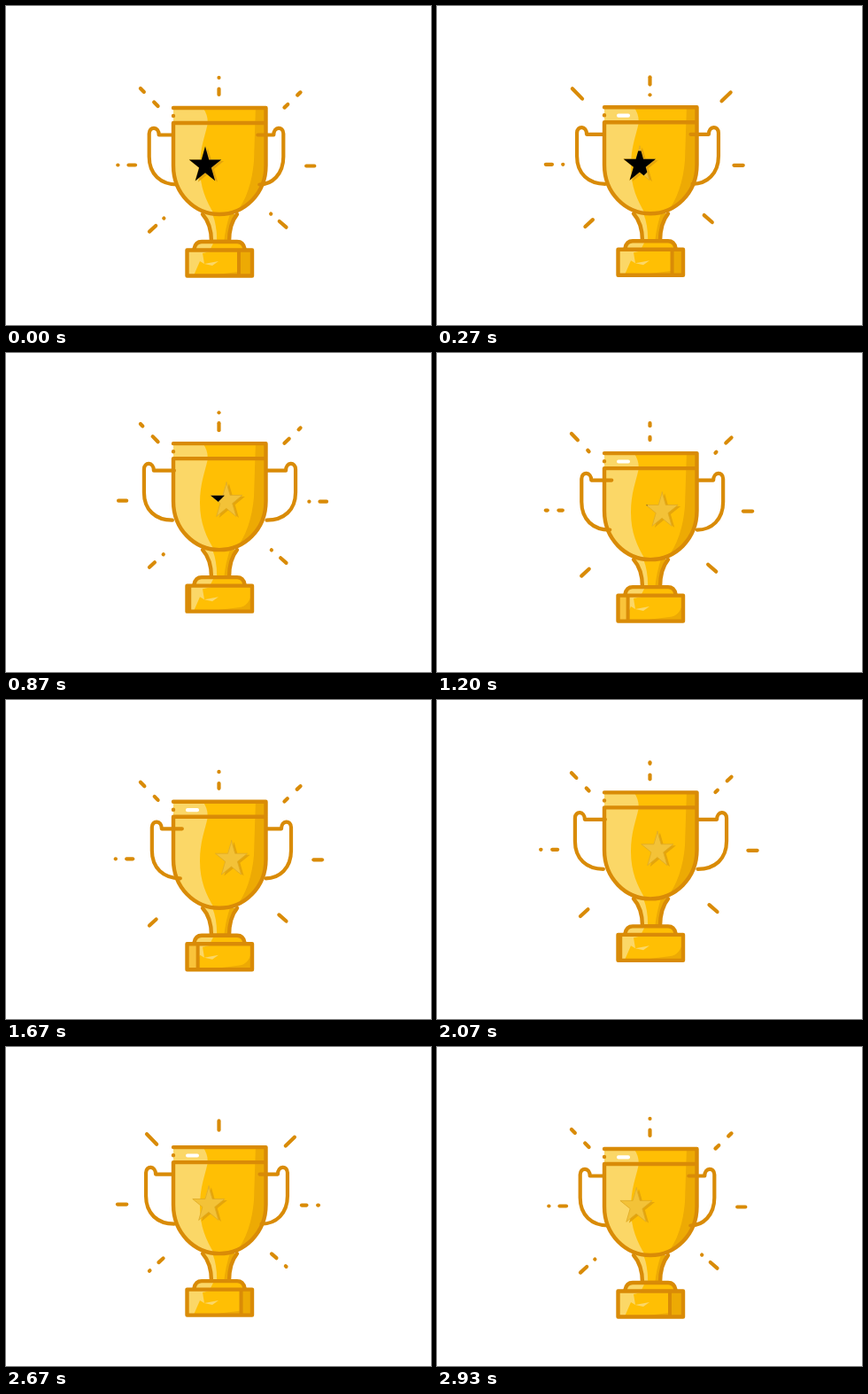
Recreate the animation shown at these times as an HTML page with a canvas. Size 480x360 px, loop 2.99 s.

```html
<!DOCTYPE html>
<html lang="en">
<head>
<meta charset="utf-8">
<title>Trophy</title>
<style>
html, body { margin: 0; width: 100%; height: 100%; overflow: hidden; background: #fff; }
canvas { display: block; }
</style>
</head>
<body>
<canvas id="stage" width="480" height="360"></canvas>
<script>
const ctx = document.getElementById('stage').getContext('2d');
const LOOP = 2990, STEP = 200 / 3, CYCLE = 44;
const LINE = '#d98b07', GOLD = '#ffbf04', LIGHT = '#fbd767', SHADE = '#edaa04';

const cup = new Path2D('M189 115H293.5V180C293.5 212 269 235 241 235S189 212 189 180Z');
const cupLight = new Path2D('M185 112H220Q229 122 227.5 134C225 146 219 160 219 182C219 206 227 222 237 238H185Z');
const cupShade = new Path2D('M282 112H298V240H253C270 226 278 200 280 175Z');
const cupLines = new Path2D('M189 115H293.5M189 124V124.1M293.5 115V180C293.5 212 269 235 241 235S189 212 189 180V132H293.5');
const stem = new Path2D('M222 235Q232 246 232 266H252Q252 246 261 235');
const plate = new Path2D('M212.5 274Q214 266 221 266H261Q268 266 269.5 274');
const base = new Path2D('M204.5 275.5H278V304.5H204.5Z');

const star = new Path2D();
for (let i = 0; i < 10; i++) {
  const r = i % 2 ? 7.6 : 20, a = i * Math.PI / 5;
  star.lineTo(r * Math.sin(a) * .95, -r * Math.cos(a) * 1.07);
}
star.closePath();

function fill(path, color) { ctx.fillStyle = color; ctx.fill(path); }

function stroke(path, width = 4.4) {
  ctx.strokeStyle = LINE;
  ctx.lineWidth = width;
  ctx.stroke(path);
}

function clipped(path, draw) {
  ctx.save();
  ctx.clip(path);
  draw();
  ctx.restore();
}

// A ray from its outer to its inner end, broken by a gap that travels outwards
function ray(x0, y0, x1, y1, gap) {
  const len = Math.hypot(x1 - x0, y1 - y0), half = .19 * len;
  const dx = (x1 - x0) / len, dy = (y1 - y0) / len;
  const mid = (gap - Math.floor(gap)) * len;
  for (let k = -1; k < 2; k++) {
    const a = Math.max(0, mid + k * len + half);
    const b = Math.min(len, mid + (k + 1) * len - half);
    if (b - a < 1.5) continue;
    const cap = Math.min(2, (b - a) / 2 - .05), p = new Path2D();
    p.moveTo(x0 + dx * (a + cap), y0 + dy * (a + cap));
    p.lineTo(x0 + dx * (b - cap), y0 + dy * (b - cap));
    stroke(p, 4.2);
  }
}

// side: 1 opens to the right (left handle), -1 opens to the left
function handle(x, side, arm) {
  const p = new Path2D(), at = d => x + side * d;
  p.moveTo(at(arm), 145.5);
  p.lineTo(at(11), 145.5);
  p.bezierCurveTo(at(11), 135.5, at(0), 135.5, at(0), 144);
  p.lineTo(at(0), 170);
  p.bezierCurveTo(at(0), 190, at(13), 201.5, at(arm - 2), 201.5);
  stroke(p, 4.2);
}

function drawStar(x, n) {
  ctx.save();
  ctx.translate(x + 3, 181.5);
  clipped(star, () => { ctx.fillStyle = '#e5a50a'; ctx.fillRect(-25, -25, 50, 50); });
  ctx.translate(-3, -1.5);
  fill(star, '#f3c238');
  ctx.strokeStyle = '#dfaa25';
  ctx.lineWidth = .8;
  ctx.stroke(star);
  // dark face, wiped away towards the left arm
  const edge = 28 - 2.8 * n, top = Math.min(-6.5, -25 + 2.3 * n);
  if (edge > -24) {
    const wipe = new Path2D();
    wipe.moveTo(-40, top);
    wipe.lineTo(edge - top, top);
    wipe.lineTo(edge - 30, 30);
    wipe.lineTo(-40, 30);
    clipped(wipe, () => fill(star, '#000'));
  }
  ctx.restore();
}

function drawBase(cos) {
  fill(stem, GOLD);
  clipped(stem, () => {
    fill(new Path2D('M220 232H232Q239 248 238 268H220Z'), LIGHT);
    fill(new Path2D('M254 232H264V268H246Q248 248 254 232Z'), SHADE);
  });
  stroke(stem);
  fill(plate, GOLD);
  clipped(plate, () => fill(new Path2D('M210 264H236L230 276H210Z'), LIGHT));
  stroke(plate);

  const seam = cos > 0 ? 279 - 16 * cos : 203 - 15 * cos;
  fill(base, GOLD);
  clipped(base, () => {
    fill(new Path2D('M204 275H240L222 279L224 291L219 288L212 304H204Z'), LIGHT);
    fill(new Path2D('M224 291L240 288L233 293Z'), LIGHT);
    fill(new Path2D('M278 280Q276 299 262 300L230 304H279Z'), SHADE);
    ctx.fillStyle = cos > 0 ? SHADE : '#f9c33a';
    if (cos > 0) ctx.fillRect(seam, 275, 20, 30);
    else ctx.fillRect(200, 275, seam - 200, 30);
    ctx.fillStyle = LINE;
    ctx.fillRect(seam - 2, 275, 4, 30);
  });
  stroke(base);
}

function drawCup() {
  fill(cup, GOLD);
  clipped(cup, () => { fill(cupLight, LIGHT); fill(cupShade, SHADE); });
  stroke(cupLines);
}

function draw(n) {
  const turn = 2 * Math.PI * n / CYCLE, cos = Math.cos(turn);
  const spread = Math.abs(Math.sin(turn)) ** 1.5;
  const lift = 14 * ((1 + Math.cos(2 * turn - 3.302)) / 2) ** 2;
  const middle = 240.6 - 3.1 * cos, reach = 75.8 + 10.4 * spread;
  const left = middle - reach, right = middle + reach;
  const gap = .36 - 7 * n / CYCLE;

  ctx.fillStyle = '#fff';
  ctx.fillRect(0, 0, 480, 360);
  ctx.save();
  ctx.translate(0, -lift);
  ctx.lineCap = ctx.lineJoin = 'round';

  ray(240.5, 79, 240.5, 102, gap);
  ray(150.5, 91.5, 173, 114.5, gap + .13);
  ray(334, 96, 313, 116, gap + .13);
  ray(160.5, 256, 179, 239, gap + .38);
  ray(318, 251, 298.5, 234, gap + .38);
  const out = 125 - 10.5 * spread;
  ray(out, 179.5, out + 23, 179.5, gap - .05);
  ray(right + 37, 180.5, right + 14, 180.5, gap + .4);

  const leftHandle = () => handle(left, 1, 34);
  const rightHandle = () => handle(right, -1, 29 + 6 * spread);
  const [back, front] = cos > 0 ? [leftHandle, rightHandle] : [rightHandle, leftHandle];
  drawBase(cos);
  back();
  drawCup();
  if (n > 0 && lift < 2) {
    ctx.fillStyle = '#fff';
    ctx.beginPath();
    ctx.roundRect(203, 122.3, 15, 4.2, 2);
    ctx.fill();
  }
  drawStar(242.5 - 15 * cos - 2.5 * Math.cos(2 * turn), n);
  front();
  ctx.restore();
}

function tick() {
  const t = performance.now() % LOOP;
  draw(Math.min(CYCLE, Math.floor((t + 3.4) / STEP)));
  requestAnimationFrame(tick);
}
tick();
</script>
</body>
</html>
```
